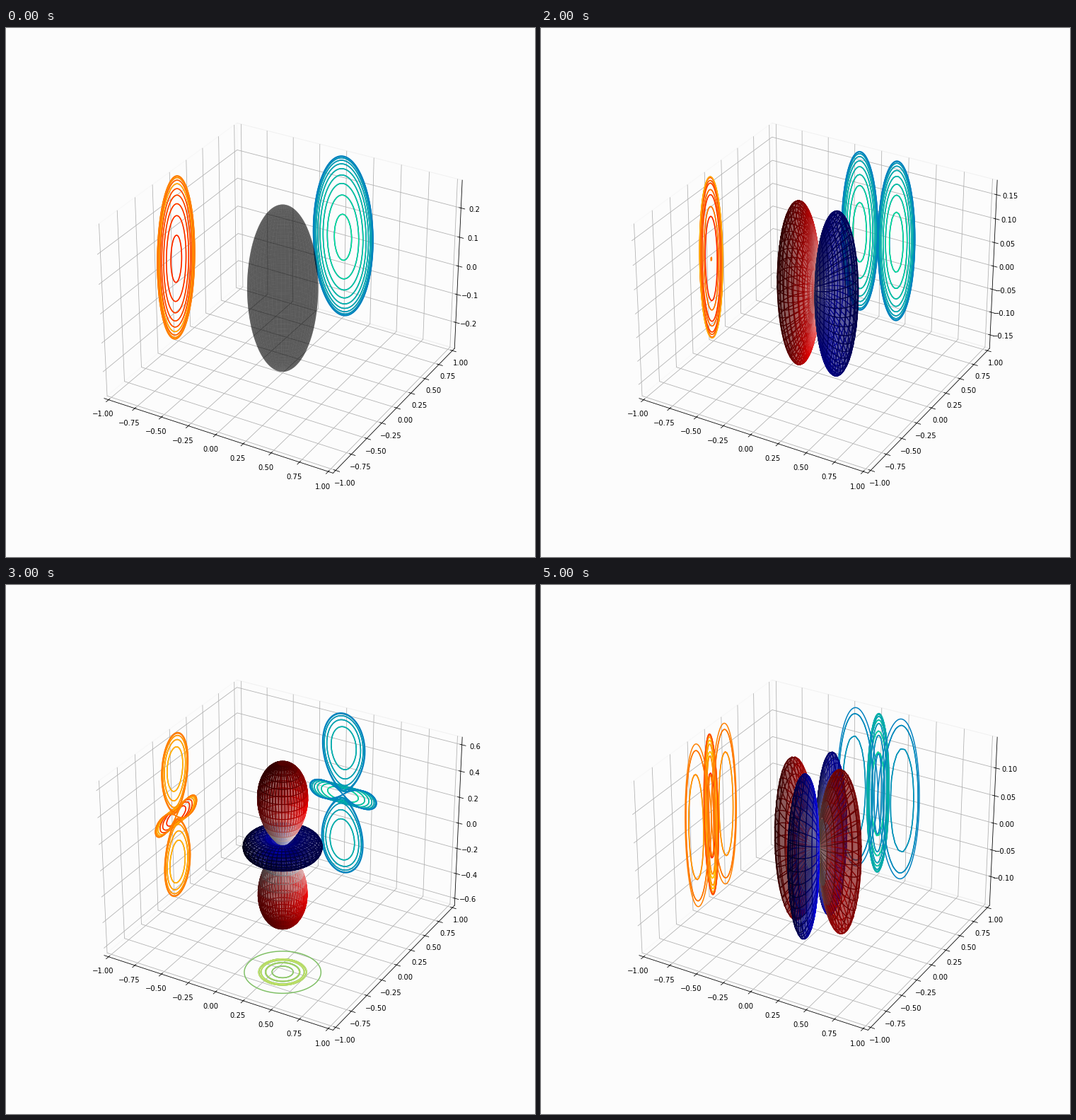
These frames come from a looping animation (748 by 748 pixels, 6 s). A matplotlib script:

```python
import numpy as np
import matplotlib.pyplot as plt
from matplotlib.animation import FuncAnimation
from matplotlib.ticker import MaxNLocator

SIZE, DPI = 748, 72
MARGIN = 25 / 24
PI = np.pi

phi, theta = np.meshgrid(np.linspace(0, 2 * PI, 100), np.linspace(0, PI, 100))
s, c = np.sin(theta), np.cos(theta)

# Real parts of the spherical harmonics for l = 0, 1, 2 and m = 0..l
HARMONICS = [
    np.full_like(theta, np.sqrt(1 / (4 * PI))),
    np.sqrt(3 / (4 * PI)) * c,
    -np.sqrt(3 / (8 * PI)) * s * np.cos(phi),
    np.sqrt(5 / (16 * PI)) * (3 * c**2 - 1),
    -np.sqrt(15 / (8 * PI)) * s * c * np.cos(phi),
    np.sqrt(15 / (32 * PI)) * s**2 * np.cos(2 * phi),
]

# Wall, its position, colours, and a tiny shift that puts high levels in front
WALLS = [
    ("x", -1, "autumn", 0),
    ("y", 1, "winter", -1e-9),
    ("z", -1, "summer", 1e-9),
]

fig = plt.figure(figsize=(SIZE / DPI, SIZE / DPI), dpi=DPI, facecolor="#fcfcfc")
ax = fig.add_subplot(projection="3d", facecolor="none")


def face_colors(values):
    span = np.ptp(values)
    if span == 0:
        return np.zeros(values.shape + (4,))
    return plt.cm.seismic((values - values.min()) / span)


def project(xyz, wall, pos, cmap, shift):
    """Contour the surface along one axis, one artist per level."""
    data = xyz["xyz".index(wall)]
    lo, hi = data.min(), data.max()
    levels = MaxNLocator(21, min_n_ticks=1).tick_values(lo, hi)
    inside = levels[(levels > lo) & (levels < hi)]
    step = levels[1] - levels[0]
    for level in inside:
        ax.contour(*xyz, levels=[level], zdir=wall, offset=pos + shift * level,
                   cmap=cmap, vmin=inside[0] - step, vmax=inside[-1] + step)


def draw(i):
    ax.clear()
    values = HARMONICS[i]
    r = np.abs(values)
    xyz = r * s * np.cos(phi), r * s * np.sin(phi), r * c

    ax.plot_surface(*xyz, facecolors=face_colors(values), alpha=0.4)
    for wall in WALLS:
        project(xyz, *wall)

    top = np.abs(xyz[2]).max()
    ticks = MaxNLocator(9, steps=[1, 2, 2.5, 5, 10]).tick_values(-top, top)
    ax.set_zticks(ticks[np.abs(ticks) <= top])
    ax.set_xlim(-MARGIN, MARGIN)
    ax.set_ylim(-MARGIN, MARGIN)
    ax.set_zlim(-top * MARGIN, top * MARGIN)
    ax.view_init(elev=30, azim=-60)
    for axis in (ax.xaxis, ax.yaxis, ax.zaxis):
        axis.pane.fill = False
    return []


anim = FuncAnimation(fig, draw, frames=len(HARMONICS), interval=1000,
                     init_func=lambda: draw(0), repeat=True, repeat_delay=0)
plt.show()
```
